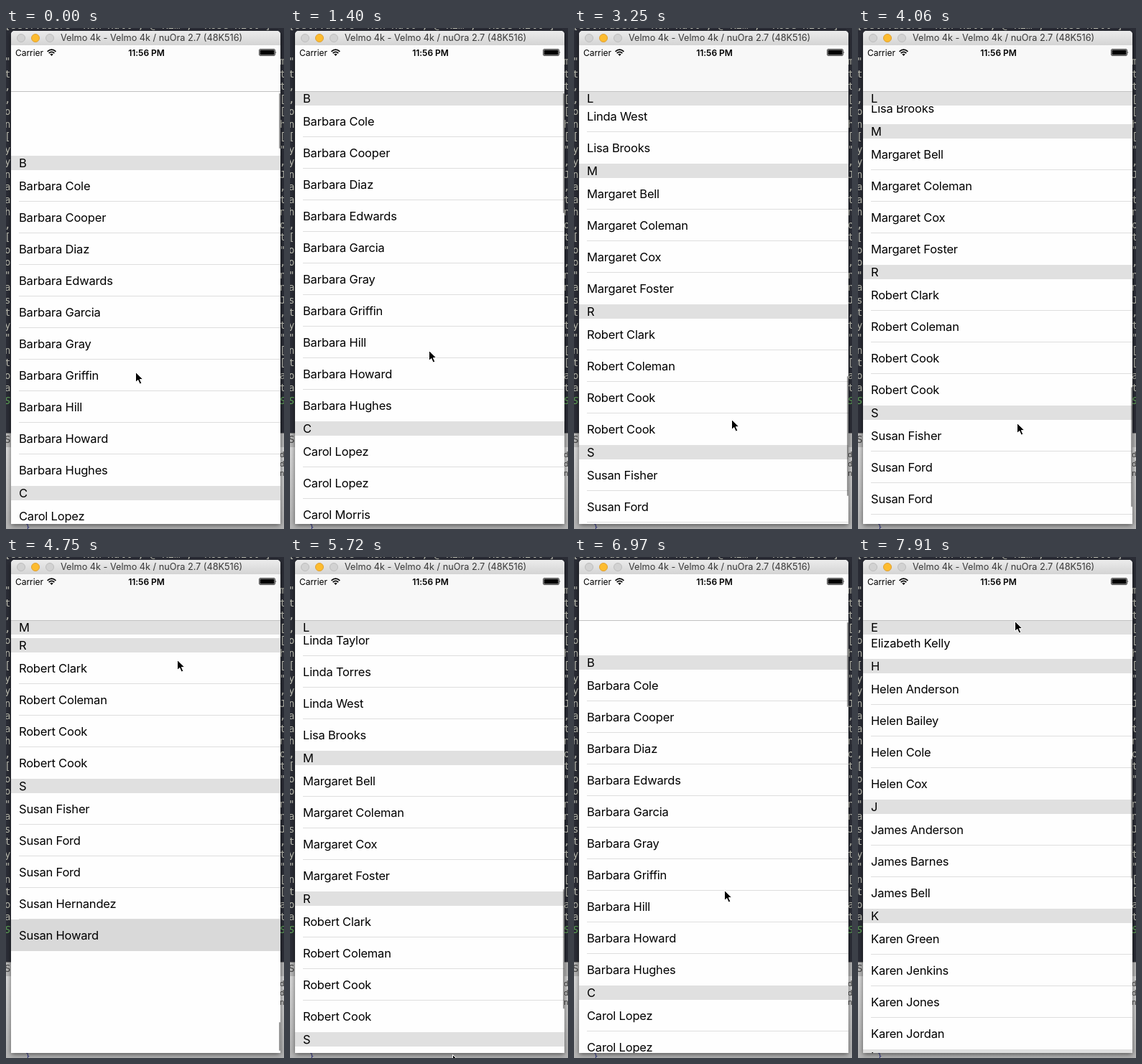
An HTML page that plays this animation: 387x698 px, repeating every 8 s.

```html
<!DOCTYPE html>
<html lang="en">
<head>
<meta charset="utf-8">
<title>Contact list</title>
<style>
html, body { margin: 0; width: 100%; height: 100%; overflow: hidden; }
body { font-family: Inter, Roboto, sans-serif; color: #000; }
#stage { position: relative; width: 387px; height: 698px; overflow: hidden; background: #2b2d36; }
#stage > *, #phone > * { position: absolute; }
.code { margin: 0; font: 14px/17.5px "DejaVu Sans Mono", monospace; color: #bfc0b4; white-space: pre; }
.code i { color: #65ad5c; }
#desk { left: 0; top: 584px; width: 387px; height: 114px; background: linear-gradient(#d9d9d9, #b4b4b4); }
#bar { left: 0; top: 564px; width: 387px; height: 20px; background: #b9b9b9; border-top: 1px solid #777; box-sizing: border-box; }
#window { left: 7px; top: 4px; width: 375px; height: 687px; border-radius: 5px 5px 0 0; background: #fff; box-shadow: 0 2px 7px rgba(0,0,0,.55); }
#title { left: 7px; top: 4px; width: 375px; height: 20px; border-radius: 5px 5px 0 0; background: linear-gradient(#ececec, #d4d4d4); }
#title b { position: absolute; top: 4px; width: 10px; height: 10px; border: 1px solid #bdbdbd; border-radius: 50%; background: #d2d2d2; }
#title span { position: absolute; left: 69px; top: 0; font-size: 12.7px; line-height: 20px; color: #383838; white-space: pre; }
#phone { left: 7px; top: 24px; width: 375px; height: 667px; overflow: hidden; background: #fefefe; }
#view { left: 0; top: 64px; width: 375px; height: 603px; overflow: hidden; }
#list { position: absolute; top: 0; left: 0; width: 375px; }
.head, .row { position: relative; padding-left: 11px; font-size: 16.5px; letter-spacing: -.2px; white-space: nowrap; }
.head { z-index: 1; height: 20px; line-height: 20px; background: #e0e0e0; }
.row { height: 44px; line-height: 44px; }
.row:not(:last-child)::after { content: ""; position: absolute; left: 11px; right: 0; bottom: 0; height: 1px; background: #dedede; }
.selected { background: #d9d9d9; }
#thumb { position: absolute; right: 0; top: 0; width: 2.5px; border-radius: 2px; background: rgba(0,0,0,.4); }
#nav { left: 0; top: 0; width: 375px; height: 64px; border-bottom: 1px solid #c2c2c2; }
.status { top: 3px; font-size: 12px; line-height: 15px; letter-spacing: -.05px; }
svg { overflow: visible; }
</style>
</head>
<body>
<div id="stage">
  <pre class="code" style="left:-2px;top:-12px">[self.users "Ken Hall", @"Kim", "Rose Hill"]</pre>
  <pre class="code" style="left:-2px;top:38px" id="left"></pre>
  <pre class="code" style="left:381px;top:38px" id="right"></pre>
  <div id="bar"></div>
  <div id="desk"></div>
  <pre class="code" style="left:-2px;top:565px;color:#444">S</pre>
  <pre class="code" style="left:381px;top:588px;font-size:11px;line-height:13px;color:#333">de
de
no</pre>
  <pre class="code" style="left:27px;top:687px;font-size:11px;color:#2a2f80">}</pre>
  <div id="window"></div>
  <div id="title">
    <b style="left:8px"></b>
    <b style="left:28px;background:#fdbc2f;border-color:#dea035"></b>
    <b style="left:48px"></b>
    <span>Velmo 4k - Velmo 4k / nuOra 2.7 (48K516)</span>
  </div>
  <div id="phone">
    <div id="view"><div id="list"></div><div id="thumb"></div></div>
    <div id="nav"></div>
    <span class="status" style="left:6px">Carrier</span>
    <svg style="left:50px;top:5px" width="13" height="10" fill="none" stroke="#000" stroke-width="1.7">
      <path d="M.6 3.9Q6.5-1.6 12.4 3.9M2.7 6.2Q6.5 2.7 10.3 6.2"/>
      <path d="M6.5 10L4.3 7.6Q6.5 6 8.7 7.6Z" fill="#000" stroke="none"/>
    </svg>
    <b class="status" style="left:0;width:377px;text-align:center;font-weight:600">11:56 PM</b>
    <svg style="left:345px;top:5px" width="25" height="10">
      <rect x=".5" y=".5" width="22" height="9" rx="1.5" fill="none" stroke="#000" stroke-width=".7"/>
      <rect x="1.5" y="1.5" width="20" height="7" rx=".6"/>
      <path d="M23.6 3.2Q25 5 23.6 6.8Z"/>
    </svg>
  </div>
  <svg id="cursor" style="left:0;top:0" width="12" height="18">
    <path d="M.5.5V14.5L3.8 11.5 6.2 17 8.8 15.9 6.4 10.6H10.8Z" fill="#000" stroke="#fff" stroke-linejoin="round"/>
  </svg>
</div>
<script>
const LOOP = 8000, HEAD = 20, ROW = 44, VIEW = 603;

const sections = {
  B: "Barbara Cole,Barbara Cooper,Barbara Diaz,Barbara Edwards,Barbara Garcia,Barbara Gray,Barbara Griffin,Barbara Hill,Barbara Howard,Barbara Hughes",
  C: "Carol Lopez,Carol Lopez,Carol Morris",
  D: "Donna Foster",
  E: "Elizabeth Kelly",
  H: "Helen Anderson,Helen Bailey,Helen Cole,Helen Cox",
  J: "James Anderson,James Barnes,James Bell",
  K: "Karen Green,Karen Jenkins,Karen Jones,Karen Jordan",
  L: "Linda Taylor,Linda Taylor,Linda Torres,Linda West,Lisa Brooks",
  M: "Margaret Bell,Margaret Coleman,Margaret Cox,Margaret Foster",
  R: "Robert Clark,Robert Coleman,Robert Cook,Robert Cook",
  S: "Susan Fisher,Susan Ford,Susan Ford,Susan Hernandez,Susan Howard"
};

const $ = id => document.getElementById(id);
const clamp = (v, lo, hi) => Math.max(lo, Math.min(hi, v));
const move = (el, x, y) => el.style.transform = `translate(${x}px, ${y}px)`;

// Easings: a calm move, a quick flick, a slow pull that speeds up.
const calm = u => u * u * (3 - 2 * u);
const flick = u => u ** 1.4;
const pullAway = u => u ** 2.4;

// Where the pointer goes: time, x, y and how it gets there.
const stops = [
  { t: 0, x: 180, y: 479 },
  { t: 890, x: 180, y: 479 },
  { t: 1100, x: 176, y: 402 },
  { t: 1630, x: 204, y: 480 },
  { t: 1890, x: 190, y: 36, ease: flick },
  { t: 2450, x: 173, y: 462 },
  { t: 3250, x: 219, y: 545 },
  { t: 4260, x: 221, y: 551 },
  { t: 4750, x: 238, y: 143 },
  { t: 5060, x: 239, y: 143 },
  { t: 5720, x: 226, y: 693, ease: pullAway },
  { t: 6600, x: 209, y: 464 },
  { t: 6970, x: 209, y: 464 },
  { t: 7400, x: 211, y: 478 },
  { t: 7720, x: 215, y: 8, ease: flick },
  { t: LOOP, x: 219, y: 115 }
];

function pointerAt(t) {
  const i = stops.findIndex(stop => stop.t > t);
  const a = stops[i - 1], b = stops[i];
  const u = (b.ease || calm)((t - a.t) / (b.t - a.t));
  return { x: a.x + (b.x - a.x) * u, y: a.y + (b.y - a.y) * u };
}

// Scroll physics: momentum, spring back to the top, rubber band past the end.
const glide = (from, to, dt) => to + (from - to) * Math.exp(-dt / 500);
const settle = (from, dt) => from * (1 + dt / 90) * Math.exp(-dt / 90);
function stretch(offset) {
  const over = Math.max(0, offset - maxScroll);
  return offset - over + VIEW * (1 - 1 / (over * .55 / VIEW + 1));
}

function scrollAt(t, y) {
  if (t < 1630) return settle(-90, t);
  if (t < 1890) return 480 - y;
  if (t < 4260) return glide(444, 1492, t - 1890);
  if (t < 5720) return stretch(1484 + 551 - y);
  if (t < 6970) return -49 + 1391 * (1 - (t - 5720) / 1250) ** 3;
  if (t < 7400) return settle(-49, t - 6970);
  if (t < 7720) return 478 - y;
  return glide(470, 1153, t - 7720);
}

// Edges of the code editor behind the window.
let seed = 7;
const random = () => (seed = seed * 16807 % 2147483647) / 2147483647;
const glyphs = "\"\"\",,[Jsnmaoyht ";
for (const side of ["left", "right"]) {
  const lines = Array.from({ length: 27 }, () => glyphs[Math.floor(random() * glyphs.length)]);
  $(side).innerHTML = lines.join("\n") + "\n<i>S</i>";
}

let total = 0;
const heads = Object.entries(sections).map(([letter, names]) => {
  const rows = names.split(",");
  const section = document.createElement("div");
  section.innerHTML = `<div class="head">${letter}</div>` +
    rows.map(name => `<div class="row">${name}</div>`).join("");
  $("list").append(section);
  const head = { el: section.firstChild, top: total, room: rows.length * ROW };
  total += HEAD + head.room;
  return head;
});
$("list").lastChild.lastChild.classList.add("selected");
const maxScroll = total - VIEW;

function drawThumb(offset) {
  const track = VIEW - 6, full = track * VIEW / total;
  const size = Math.max(40, full - Math.max(0, -offset, offset - maxScroll));
  const top = clamp(offset / maxScroll, 0, 1) * (track - (offset > maxScroll ? size : full));
  $("thumb").style.height = size + "px";
  move($("thumb"), 0, 3 + top);
}

const start = performance.now();
function draw() {
  // Time advances in 10 ms ticks.
  const t = Math.floor((performance.now() - start) % LOOP / 10) * 10;
  const pointer = pointerAt(t);
  const offset = Math.round(scrollAt(t, pointer.y));
  move($("list"), 0, -offset);
  for (const { el, top, room } of heads) move(el, 0, clamp(offset - top, 0, room));
  drawThumb(offset);
  $("nav").style.background = offset > 0 ? "#f8f8f8" : "#fcfcfc";
  move($("cursor"), Math.round(pointer.x), Math.round(pointer.y));
  requestAnimationFrame(draw);
}
draw();
</script>
</body>
</html>
```
